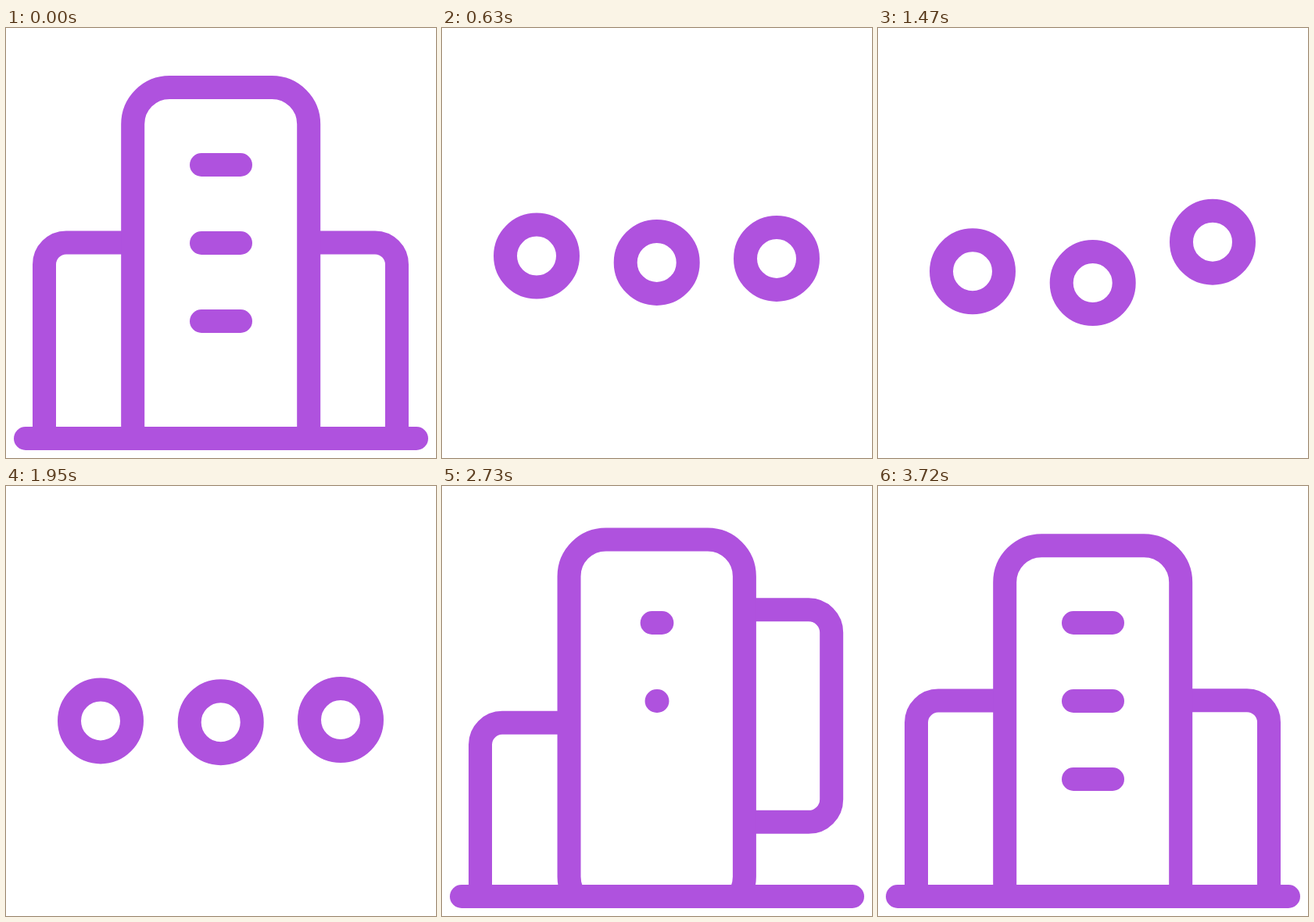
Animation, 550 px wide and 550 px high, one loop 3750 ms. Source, as an HTML page with a canvas:

```html
<!DOCTYPE html>
<html lang="en">
<head>
<meta charset="utf-8">
<title>Building loader</title>
<style>
  html, body { margin: 0; width: 100%; height: 100%; overflow: hidden; background: #fff; }
  canvas { display: block; width: 550px; height: 550px; }
</style>
</head>
<body>
<canvas id="stage" width="550" height="550"></canvas>
<script>
const ctx = document.getElementById('stage').getContext('2d');
const LOOP = 3750, STEP = 30;
const COLOR = '#af52de', STROKE = 30;
const REST = 300, TOP = 219, GROUND = 525;
const CIRCLE = 110;

const clamp = v => Math.min(1, Math.max(0, v));
const mix = (a, b, p) => a + (b - a) * p;
const sine = p => (1 - Math.cos(Math.PI * p)) / 2;
const fall = p => p * p;
const lift = p => Math.pow(p, 1.2);

// Cubic bezier (.4, 0, .2, 1), solved by bisection.
function swift(x) {
  x = clamp(x);
  let lo = 0, hi = 1;
  for (let i = 0; i < 24; i++) {
    const s = (lo + hi) / 2, r = 1 - s;
    if (1.2 * r * r * s + 0.6 * r * s * s + s * s * s < x) lo = s; else hi = s;
  }
  return lo * lo * (3 - 2 * lo);
}

// Damped swing that follows a landing.
const swing = (ms, size) =>
  ms > 0 ? size * Math.sin(ms * 2 * Math.PI / 455) * Math.exp(-0.0055 * ms) : 0;

// order: place in the wave; shrinkAt: start of the collapse.
function makeBlock(x, homeY, w, h, radius, order, shrinkAt, liftSwing, landSwing) {
  const wave = 848 + 109 * order, lag = 115 * order;
  return {
    x, homeY, w, h, radius, shrinkAt,
    growAt: 2091 + lag,
    moves: [
      { at: shrinkAt, ms: 413, to: REST, ease: lift, swing: -liftSwing },
      { at: wave, ms: 215, to: TOP, ease: sine, swing: 0 },
      { at: wave + 215, ms: 230, to: REST, ease: fall, swing: 47 },
      { at: 2040 + lag, ms: 215, to: TOP, ease: sine, swing: 0 },
      { at: 2290 + lag, ms: 340, to: homeY, ease: fall, swing: landSwing }
    ]
  };
}

const left = makeBlock(121, 416, 174, 313, 28, 0, 115, 15, 50);
const tower = makeBlock(274.7, 316, 255, 510, 47, 1, 0, 2, 38);
const right = makeBlock(428, 416, 174, 313, 28, 2, 58, 15, 50);

function blockY(block, t) {
  let y = block.homeY, sway = 0;
  for (const m of block.moves) {
    if (t < m.at) break;
    y = mix(y, m.to, m.ease(clamp((t - m.at) / m.ms)));
    sway += swing(t - m.at - m.ms, m.swing);
  }
  return y + sway;
}

function drawBlock(block, t) {
  const p = t < 1500
    ? 1 - swift((t - block.shrinkAt) / 460)
    : swift((t - block.growAt) / 575);
  const w = mix(CIRCLE, block.w, p) - STROKE;
  const h = mix(CIRCLE, block.h, p) - STROKE;
  const r = Math.min(mix(50, block.radius, p), w / 2, h / 2);
  ctx.beginPath();
  ctx.roundRect(block.x - w / 2, blockY(block, t) - h / 2, w, h, r);
  ctx.fill();
  ctx.stroke();
}

function drawBar(y, half) {
  if (half < 0.05) return;
  ctx.beginPath();
  ctx.moveTo(275 - half, y);
  ctx.lineTo(275 + half, y);
  ctx.stroke();
}

function draw(t) {
  ctx.fillStyle = '#fff';
  ctx.fillRect(0, 0, 550, 550);
  ctx.strokeStyle = COLOR;
  ctx.lineWidth = STROKE;
  ctx.lineCap = 'round';

  ctx.save();
  ctx.beginPath();
  ctx.rect(0, 0, 550, GROUND);
  ctx.clip();
  [left, right, tower].forEach(block => drawBlock(block, t));
  ctx.restore();

  for (let i = 0; i < 3; i++) {
    const shown = t < 1500 ? 1 - swift(t / 230) : swift((t - 2640 - 60 * i) / 350);
    drawBar(175 + 100 * i, 25 * shown);
  }
  const ground = t < 1500 ? 1 - swift((t - 168) / 460) : swift((t - 2121) / 575);
  drawBar(GROUND, 250 * ground);
}

const start = performance.now();
function tick() {
  const t = (performance.now() - start) % LOOP;
  draw(Math.floor(t / STEP) * STEP);
  requestAnimationFrame(tick);
}
tick();
</script>
</body>
</html>
```
